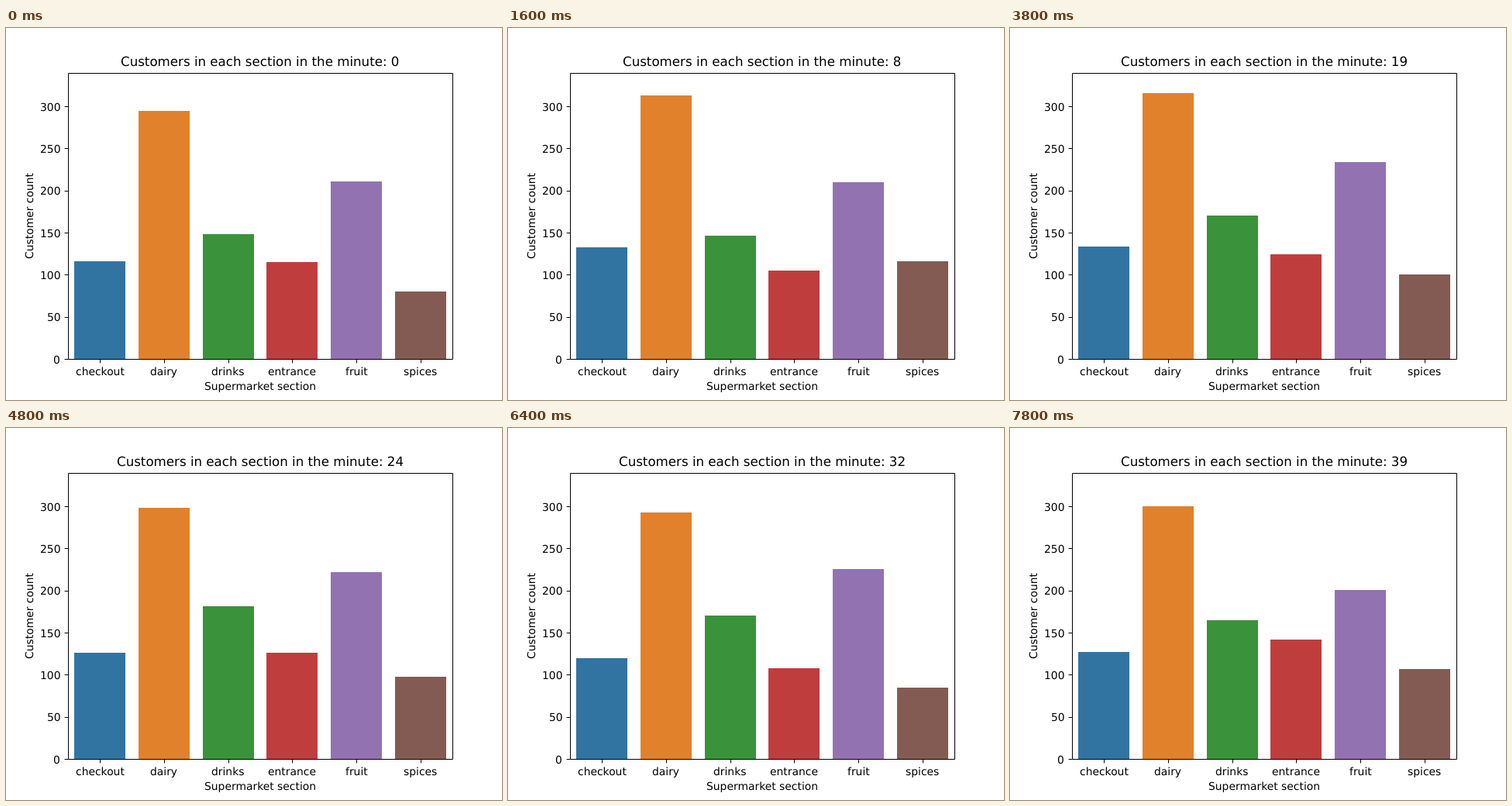
An HTML page that plays this animation: 640 px wide and 480 px high, repeating every 8 s.

```html
<!DOCTYPE html>
<html lang="en">
<head>
<meta charset="utf-8">
<title>Customers per section</title>
<style>
html, body { margin: 0; width: 100%; height: 100%; overflow: hidden; background: #fff; }
svg { display: block; width: 640px; height: 480px; }
text { font-family: "DejaVu Sans", sans-serif; text-rendering: geometricPrecision; }
path { stroke: #000; fill: none; }
</style>
</head>
<body>
<svg id="chart" viewBox="0 0 640 480"></svg>
<script>
const STEP = 200, MINUTES = 40;
const LEFT = 80, RIGHT = 576, TOP = 57.6, BOTTOM = 427.2, MAX = 340;
const SLOT = (RIGHT - LEFT) / 6;
const SMALL = 10 * 100 / 72, LARGE = 12 * 100 / 72;

// Key minutes shared by all sections, with the count of each at those times.
const keys = [0, 8, 13, 19, 28, 32, 39];
const sections = [
  { name: 'checkout', color: '#3274a1', counts: [116, 133, 129, 134, 117, 120, 127] },
  { name: 'dairy', color: '#e1812c', counts: [295, 313, 308, 316, 293, 293, 300] },
  { name: 'drinks', color: '#3a923a', counts: [148, 146, 156, 170, 185, 170, 165] },
  { name: 'entrance', color: '#c03d3e', counts: [115, 105, 117, 124, 121, 108, 142] },
  { name: 'fruit', color: '#9372b2', counts: [211, 210, 210, 234, 207, 226, 201] },
  { name: 'spices', color: '#845b53', counts: [80, 116, 108, 100, 97, 85, 107] }
];

const chart = document.getElementById('chart');

function add(tag, attrs) {
  const el = document.createElementNS('http://www.w3.org/2000/svg', tag);
  for (const name in attrs) el.setAttribute(name, attrs[name]);
  chart.appendChild(el);
  return el;
}

// Starts the text on a whole pixel; align is 0.5 for centred, 1 for right.
function setText(el, text, x, align) {
  el.textContent = text;
  el.setAttribute('x', Math.round(x - el.getComputedTextLength() * align));
}

function label(text, x, y, align = 0.5) {
  setText(add('text', { y, 'font-size': SMALL }), text, x, align);
}

const line = d => add('path', { d });
const snap = v => Math.round(v) + 0.5;
const yOf = count => BOTTOM - count * (BOTTOM - TOP) / MAX;

function noise(seed) {
  const v = Math.sin(seed * 12.9898) * 43758.5453;
  return (v - Math.floor(v)) * 2 - 1;
}

// Linear trend between keys, with a small wobble each minute.
function countAt(counts, minute, index) {
  const next = Math.max(1, keys.findIndex(k => k >= minute));
  const since = minute - keys[next - 1], left = keys[next] - minute;
  const from = counts[next - 1], to = counts[next];
  const trend = from + (to - from) * since / (since + left);
  const wobble = noise(minute * 7 + index + 1) * Math.min(since, left, 2) * 2.5;
  return Math.round(trend + wobble);
}

const bars = sections.map((s, i) => {
  const x = Math.round(LEFT + SLOT * (i + 0.1));
  const end = Math.round(LEFT + SLOT * (i + 0.9));
  return add('rect', { x, width: end - x, fill: s.color });
});

line(`M${snap(LEFT)} ${snap(TOP)}H${snap(RIGHT)}V${snap(BOTTOM)}H${snap(LEFT)}Z`);

sections.forEach((s, i) => {
  const x = LEFT + SLOT * (i + 0.5);
  line(`M${snap(x)} ${snap(BOTTOM)}v4.9`);
  label(s.name, x, 448);
});

for (let count = 0; count <= 300; count += 50) {
  const y = yOf(count);
  line(`M${snap(LEFT)} ${snap(y)}h-4.9`);
  label(count, 70.3, Math.round(y + 5.5), 1);
}

const middle = (LEFT + RIGHT) / 2;
label('Supermarket section', middle, 467);
const side = add('text', { 'font-size': SMALL, transform: 'translate(35 243) rotate(-90)' });
setText(side, 'Customer count', 0, 0.5);
const title = add('text', { y: 49, 'font-size': LARGE });

let shown = -1;
function draw(time) {
  const minute = Math.floor(time / STEP) % MINUTES;
  if (minute === shown) return;
  shown = minute;
  setText(title, 'Customers in each section in the minute: ' + minute, middle, 0.5);
  bars.forEach((bar, i) => {
    const y = Math.round(yOf(countAt(sections[i].counts, minute, i)));
    bar.setAttribute('y', y);
    bar.setAttribute('height', Math.round(BOTTOM) - y);
  });
}

const start = performance.now();
function tick() {
  draw(performance.now() - start);
  requestAnimationFrame(tick);
}
tick();
</script>
</body>
</html>
```
